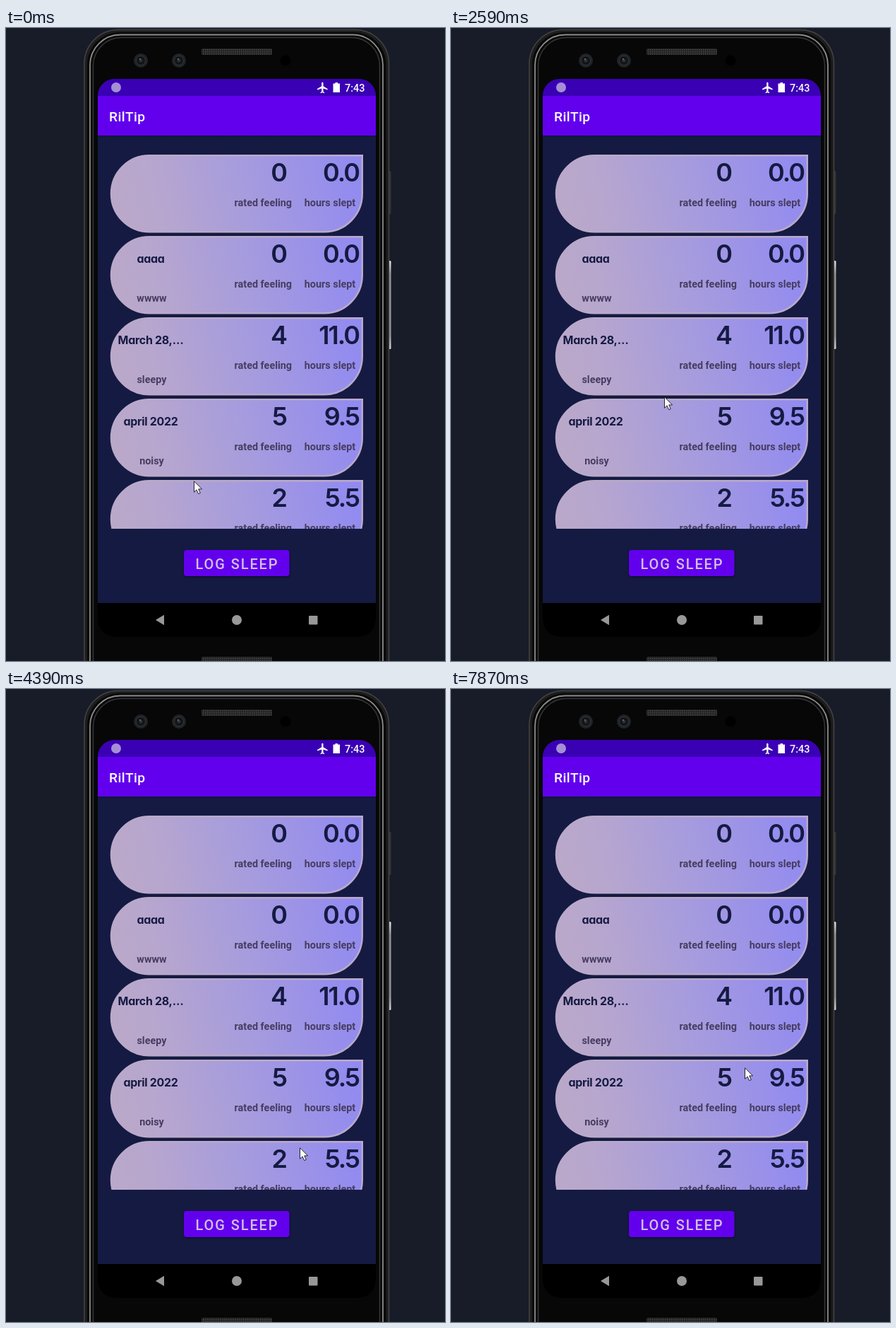
An HTML page that plays this animation: 622x895 px, repeating every 8 s.

```html
<!DOCTYPE html>
<html lang="en">
<head>
<meta charset="utf-8">
<title>Sleep log</title>
<style>
  html, body { margin: 0; width: 100%; height: 100%; overflow: hidden; background: #181c28; }
  svg { display: block; width: 622px; height: 895px; }
  text { font-family: Roboto, sans-serif; }
  .value, .name { font-family: Inter, sans-serif; font-weight: 600; fill: #151a42; font-feature-settings: "cv11"; }
  .value { font-size: 36px; letter-spacing: -2px; text-anchor: end; }
  .name { font-size: 16px; font-weight: 700; letter-spacing: -.3px; text-anchor: middle; }
  .label { font-size: 14.4px; font-weight: 700; fill: #463d60; text-anchor: middle; }
  .button { fill: #6200ee; filter: drop-shadow(0 1px 1.5px #0008); }
</style>
</head>
<body>
<svg viewBox="0 0 622 895">
  <defs>
    <linearGradient id="lilac" gradientUnits="userSpaceOnUse" x1="0" y1="110" x2="363" y2="21">
      <stop stop-color="#bba9c8"/><stop offset=".2" stop-color="#b7a6ce"/>
      <stop offset=".5" stop-color="#a89ddc"/><stop offset="1" stop-color="#9089f2"/>
    </linearGradient>
    <linearGradient id="shade" x2="0" y2="1">
      <stop stop-color="#11153a"/><stop offset="1" stop-color="#151a42"/>
    </linearGradient>
    <linearGradient id="key" x2="0" y2="1">
      <stop stop-color="#eee"/><stop offset=".15" stop-color="#999"/>
      <stop offset=".85" stop-color="#999"/><stop offset="1" stop-color="#ddd"/>
    </linearGradient>
    <pattern id="mesh" width="3" height="3" patternUnits="userSpaceOnUse">
      <path d="M0 0h3v3h-3z" fill="#222"/><path d="M0 0h1.5v1.5h-1.5z" fill="#4c4c4c"/>
    </pattern>
    <clipPath id="screen"><rect x="130" y="72" width="394" height="789" rx="24"/></clipPath>
    <clipPath id="list"><path d="M130 152h394v556h-394z"/></clipPath>
    <g id="lens">
      <circle r="10" fill="#202327"/><circle r="6.5" fill="#121416" stroke="#33373b"/>
      <circle r="2.5" fill="#2d3237"/><circle cx="-1" cy="-2" r="1" fill="#777c82"/>
    </g>
  </defs>

  <!-- Phone body -->
  <rect x="541" y="202" width="4.5" height="61" rx="1.5" fill="#333"/>
  <rect x="541" y="329" width="4.5" height="125" rx="1.5" fill="url(#key)"/>
  <rect x="111" y="2.5" width="431.5" height="960" rx="48" fill="#1d1d1d" stroke="#444" stroke-width="1.5"/>
  <rect x="115" y="6" width="423.5" height="960" rx="46" fill="#080808"/>
  <rect x="119" y="9.5" width="415" height="960" rx="43" fill="#080808" stroke="#8c8c8c" stroke-width="1.8"/>
  <rect x="123.5" y="13.5" width="406" height="960" rx="40" fill="#070707" stroke="#363636" stroke-width="1.5"/>
  <rect x="277" y="29" width="100" height="9" rx="2" fill="url(#mesh)"/>
  <rect x="277" y="889" width="100" height="9" rx="2" fill="url(#mesh)"/>
  <use href="#lens" x="191" y="46"/>
  <use href="#lens" x="245" y="46"/>
  <circle cx="396" cy="46" r="7.5"/>

  <!-- Screen -->
  <g clip-path="url(#screen)">
    <path d="M130 72h394v789h-394z" fill="#151a42"/>
    <path d="M130 72h394v24h-394z" fill="#3a00b4"/>
    <path d="M130 96h394v56h-394z" fill="#6200ee"/>
    <path d="M130 152h394v4h-394z" fill="url(#shade)"/>
    <path d="M130 813h394v48h-394z"/>
  </g>
  <circle cx="156" cy="84" r="7" fill="#a48fd6"/>
  <g fill="#fff">
    <path transform="translate(439.5 75.2) scale(.77)" d="M21 16v-2l-8-5V3.5C13 2.67 12.33 2 11.5 2S10 2.67 10 3.5V9l-8 5v2l8-2.5V19l-2 1.5V22l3.5-1 3.5 1v-1.5L13 19v-5.5z"/>
    <path d="M463.5 78.5h3V77h3.5v1.5h3V91h-9.5z"/>
    <text x="480" y="90" font-size="14.4" font-weight="500">7:43</text>
    <text x="146" y="132" font-size="19.2" font-weight="500" letter-spacing=".4">RilTip</text>
  </g>
  <g id="cards" clip-path="url(#list)"></g>
  <rect class="button" x="252" y="738" width="149.5" height="37" rx="4"/>
  <text x="327.5" y="765" font-size="20" font-weight="500" letter-spacing="1.9" text-anchor="middle" fill="#d2c0e6">LOG SLEEP</text>
  <g fill="#989898">
    <path d="M212 837l12-7.2v14.4z"/>
    <circle cx="327" cy="837" r="7"/>
    <rect x="429" y="831" width="12.5" height="12.5" rx="1"/>
  </g>
  <path id="cursor" d="M.5.8V16.2l3.5-3.3 2.7 5.7 2.6-1.1-2.6-5.6h4.8z" fill="#fff" stroke="#111" stroke-width=".9"/>
</svg>
<script>
  const entries = [
    ["", "", "0", "0.0"],
    ["aaaa", "wwww", "0", "0.0"],
    ["March 28,…", "sleepy", "4", "11.0"],
    ["april 2022", "noisy", "5", "9.5"],
    ["", "", "2", "5.5"]
  ];
  const text = (kind, x, y, s) => `<text class="${kind}" x="${x}" y="${y}">${s}</text>`;

  document.getElementById("cards").innerHTML = entries.map(([name, mood, rating, hours], i) =>
    `<g transform="translate(148 ${179 + 115 * i})">
      <path d="M55 1.25H356.75V55.5A53.75 53.75 0 0 1 303 109.25H55A54 54 0 0 1 55 1.25Z"
        fill="url(#lilac)" stroke="#b9a9c9" stroke-width="2.5"/>` +
      text("name", 57, 38, name) + text("label", 58.5, 93, mood) +
      text("value", 249, 38, rating) + text("value", 352, 38, hours) +
      text("label", 216.3, 73.3, "rated feeling") + text("label", 311, 73.3, "hours slept") +
    "</g>").join("");

  // Turning points of the pointer: tick, x, y. Equal neighbours are rests.
  const turns = [
    [0, 266, 640], [2, 269, 596], [4, 247, 239], [6, 143, 118], [7, 371, 114],
    [9, 288, 238], [11, 389, 356], [14, 166, 502], [17, 370, 530], [18, 370, 530],
    [21, 234, 608], [23, 219, 628], [30, 416, 648], [33, 416, 648], [36, 488, 663],
    [38, 455, 530], [40, 517, 560], [42, 421, 513], [53, 421, 513], [55, 416, 535]
  ];
  const loop = 8000, rest = 500, tick = 134;
  const cursor = document.getElementById("cursor"), start = performance.now();

  // The pointer is sampled once per tick and moves straight between turns.
  function pointerAt(t) {
    const n = Math.max(0, Math.floor((t - rest) / tick) + 1);
    const next = turns.findIndex(p => p[0] >= n);
    if (next < 0) return turns.at(-1).slice(1);
    if (!next) return turns[0].slice(1);
    const [n0, x0, y0] = turns[next - 1], [n1, x1, y1] = turns[next];
    const k = (n - n0) / (n1 - n0);
    return [x0 + (x1 - x0) * k, y0 + (y1 - y0) * k].map(Math.round);
  }

  function draw() {
    const [x, y] = pointerAt((performance.now() - start) % loop);
    cursor.setAttribute("transform", `translate(${x} ${y})`);
    requestAnimationFrame(draw);
  }
  draw();
</script>
</body>
</html>
```
